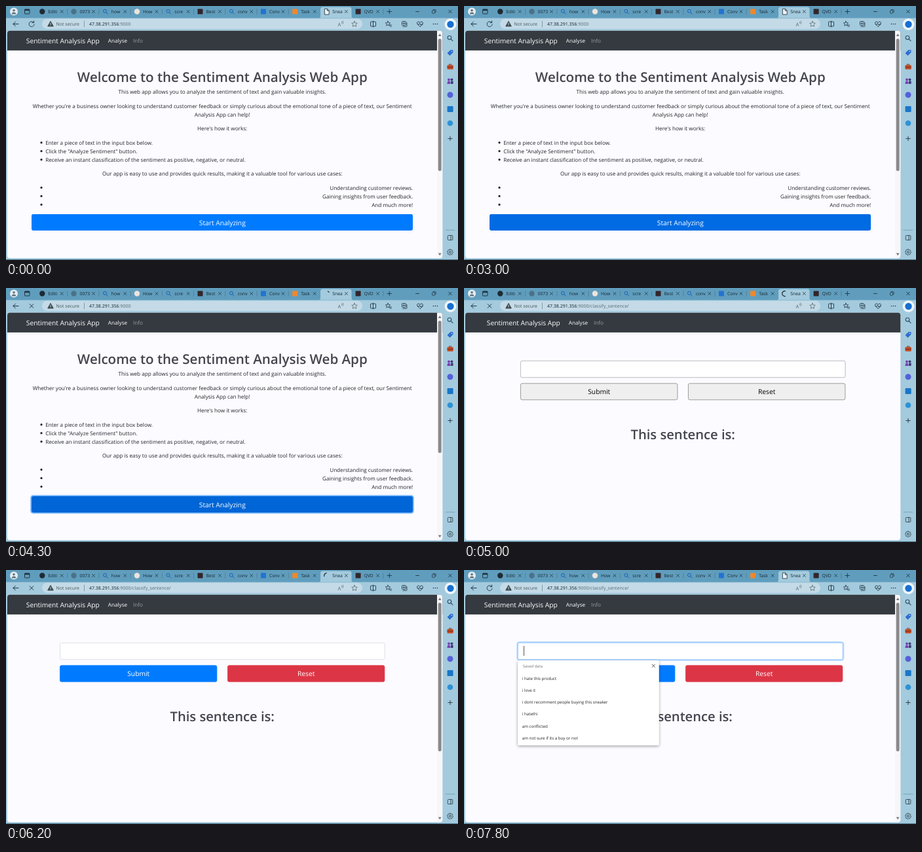
An HTML page for the animation above (8000 ms loop, 690 by 388 pixels).

```html
<!DOCTYPE html>
<html lang="en">
<head>
<meta charset="utf-8">
<title>Sentiment demo</title>
<style>
html, body { margin: 0; width: 100%; height: 100%; overflow: hidden; background: #a4cadd; }
svg { display: block; width: 690px; height: 388px; }
text { font-family: "Open Sans", "Noto Sans", sans-serif; text-rendering: geometricPrecision; white-space: pre; }
</style>
</head>
<body>
<svg id="stage" viewBox="0 0 690 388" xmlns="http://www.w3.org/2000/svg"></svg>
<script>
const LOOP = 8000, STEP = 100;
const INK = '#20343f', BODY = '#212529';
const stage = document.getElementById('stage');

// markup helpers
const text = (x, y, s, size, fill = BODY, extra = '') =>
  `<text x="${x}" y="${y}" font-size="${size}" fill="${fill}" ${extra}>${s}</text>`;
const mid = 'text-anchor="middle"', end = 'text-anchor="end"';
const rect = (x, y, w, h, fill, r = 0, extra = '') =>
  `<rect x="${x}" y="${y}" width="${w}" height="${h}" rx="${r}" fill="${fill}" ${extra}/>`;
const dot = (x, y, r, fill, extra = '') =>
  `<circle cx="${x}" cy="${y}" r="${r}" fill="${fill}" ${extra}/>`;
const line = (d, color = INK, w = 0.9, extra = '') =>
  `<path d="${d}" fill="none" stroke="${color}" stroke-width="${w}" stroke-linecap="round" stroke-linejoin="round" ${extra}/>`;
const cross = (x, y, r, color = INK, w = 0.9) =>
  line(`M${x - r} ${y - r}l${2 * r} ${2 * r}m0 ${-2 * r}l${-2 * r} ${2 * r}`, color, w);
const lens = (x, y, r, color, w) =>
  line(`M${x + r * .7} ${y + r * .7}l${r * 1.1} ${r * 1.1}`, color, w) +
  dot(x, y, r, 'none', `stroke="${color}" stroke-width="${w}"`);
const group = (id, inner, extra = '') => `<g id="${id}" ${extra}>${inner}</g>`;

// closed ring of points whose radius alternates: stars and gears
function spiky(x, y, points, radius) {
  let d = '';
  for (let i = 0; i < points; i++) {
    const a = -Math.PI / 2 + i * 2 * Math.PI / points, r = radius(i);
    d += `${i ? 'L' : 'M'}${(x + r * Math.cos(a)).toFixed(2)} ${(y + r * Math.sin(a)).toFixed(2)}`;
  }
  return d + 'Z';
}
const star = (x, y, r) => spiky(x, y, 10, i => i % 2 ? r * .48 : r);
const gear = (x, y, r) => spiky(x, y, 32, i => i % 4 < 2 ? r : r * .8);

function tabStrip() {
  const labels = ['Editi', '0073', 'how', 'How', 'scre', 'Best', 'conv', 'Conv', 'Task', 'Snea', 'QVD'];
  const search = x => lens(x - .8, 7.8, 2.5, '#1762b8', 1);
  const disc = color => x => dot(x, 8.5, 4.2, color);
  const block = color => x => rect(x - 4, 4.5, 8, 8, color, .8);
  const icons = [disc('#1f2a33'), disc('#4b7287'), search, disc('#eee3dc'), search, block('#33252a'),
    search, block('#2273d2'), block('#f0882b'), () => '', block('#33252a')];
  let s = rect(0, 0, 690, 19, '#609dbd') +
    '<path d="M477 18.5q3 0 3-3V5q0-3.5 3.5-3.5h40.5q3.5 0 3.5 3.5v10.5q0 3 3 3Z" fill="#a4cadd"/>';
  s += dot(12, 8.5, 6, '#e3edf2') + dot(12, 6.8, 1.8, '#64747d') +
    '<path d="M8.8 12.5q0-3 3.2-3t3.2 3Z" fill="#64747d"/>';
  s += rect(28.5, 5, 7.5, 7, 'none', 1, `stroke="${INK}"`) + rect(28.5, 5, 7.5, 2.2, INK);
  labels.forEach((label, i) => {
    const x = 55.3 + i * 48.23;
    s += icons[i](x) + text(x + 9, 11, label, 6.8, '#17262f') + cross(x + 30, 8.5, 2, INK, .8);
    if (i !== 8 && i !== 9) s += line(`M${x + 38.3} 5v7.5`, '#47798f', .7);
  });
  s += line('M582 8.5h6.5m-3.25-3.25v6.5');
  s += line('M625.5 8.5h5') + rect(650.5, 7, 4.2, 4.2, 'none', .7, `stroke="${INK}" stroke-width=".8"`) +
    line('M652 5.5h3.2q.9 0 .9 .9v3.2', INK, .8) + cross(678, 8.5, 2.3);
  return s;
}

function toolbar() {
  let s = rect(0, 18.5, 690, 20, '#a4cadd') + rect(55, 19.5, 489, 15.5, '#c4dbe7', 7.7);
  s += line('M19 27.5h-8m3.5-3.5l-3.5 3.5l3.5 3.5', INK, 1);
  s += group('reload', line('M42.3 25.2a4 4 0 1 0 .8 2.8m-.5-5.2v2.6h-2.6', INK, .9));
  s += group('stop', cross(39, 27.5, 2.8, INK, 1));
  s += '<path d="M68 23.3l4.3 7.7h-8.6Z" fill="#3d4a51" stroke="#3d4a51" stroke-linejoin="round"/>' +
    line('M68 26v2.3m0 1.3v.1', '#dcebf2', .9);
  s += text(76.5, 30, 'Not secure', 7, '#47555c') + line('M119.5 23v9', '#6d8996', .8);
  s += `<text x="127" y="30" font-size="7" fill="#13222b">47.38.291.356<tspan fill="#586a74">:9000<tspan id="path"></tspan></tspan></text>`;
  s += text(506.5, 30.5, 'A', 7.5, '#56666f') + line('M512.5 24q1 1 0 2.3m1.6-3.5q2 2.2 0 4.7', '#56666f', .7);
  s += line(star(532, 27.7, 4.5), '#56666f', .8);
  s += rect(556.5, 24, 8, 7, 'none', 1, `stroke="${INK}" stroke-width=".9"`) + line('M560.5 23v9');
  s += line(star(583, 27, 3.8), INK, .8) + line('M585.5 29h3m-2.5 2h2.5', INK, .8);
  s += rect(604.5, 23.5, 6, 6, 'none', 1, `stroke="${INK}" stroke-width=".9"`) +
    line('M612 25.5v5q0 1-1 1h-5m1.5-6.5v3m-1.5-1.5h3', INK, .8);
  s += line('M632 31.5l-4-4q-1.3-2.2 .5-3.3q2-.8 3.5 1.2q1.5-2 3.5-1.2q1.8 1.1 .5 3.3ZM628.5 28h2l1-1.5l1.5 2.5l1-1h2');
  for (const x of [652.5, 655.5, 658.5]) s += dot(x, 27.5, .8, INK);
  return s;
}

function sidebar() {
  const x = 678;
  let s = rect(666, 38, 24, 350, '#a4cadd');
  s += dot(678.5, 28, 9, '#eef5fa') + dot(678.5, 28, 5.2, '#176fd0');
  s += lens(x - 1, 48.3, 2.8, '#34536a', 1.2);
  s += '<path d="M674 72l4.5-4.5h3.5v3.5l-4.5 4.5Z" fill="#2f6fd0" stroke="#2f6fd0" stroke-linejoin="round"/>' +
    dot(680.3, 69.2, .8, '#d5e6f7');
  s += line('M676.5 90.5v-1.5h3.2v1.5', '#7d3a20', 1) + rect(673.5, 90.3, 9.2, 6.5, '#c04a24', 1) +
    rect(673.5, 93, 9.2, 1, '#7d2e16');
  s += dot(676, 112.5, 1.9, '#7b3fb5') + '<path d="M673.5 119q0-4.5 2.5-4.5t2.5 4.5Z" fill="#7b3fb5"/>' +
    dot(680.5, 112.3, 1.9, '#3b3d73') + rect(679, 114.5, 3.6, 4.5, '#3b3d73', .8);
  s += dot(x, 135.8, 4.5, '#5560d8') + rect(673.6, 153, 9, 9, '#1976c8', 1) + dot(x, 179, 4.3, '#2e92d5');
  s += line('M674.8 202.5h6.4m-3.2-3.2v6.4');
  s += line('M671 342.3h14', '#6795aa', .7);
  s += rect(674.3, 350.5, 7.5, 7, 'none', 1, `stroke="${INK}" stroke-width=".8"`) + line('M679 350.5v7', INK, .8);
  s += line(gear(x, 376, 4.5), INK, .8) + dot(x, 376, 1.5, 'none', `stroke="${INK}" stroke-width=".8"`);
  return s;
}

function homePage() {
  const lines = [
    [134, 'This web app allows you to analyze the sentiment of text and gain valuable insights.'],
    [156, 'Whether you\'re a business owner looking to understand customer feedback or simply curious about the emotional tone of a piece of text, our Sentiment'],
    [168.7, 'Analysis App can help!'],
    [190, 'Here\'s how it works:'],
    [259, 'Our app is easy to use and provides quick results, making it a valuable tool for various use cases:']
  ];
  const steps = ['Enter a piece of text in the input box below.', 'Click the "Analyze Sentiment" button.',
    'Receive an instant classification of the sentiment as positive, negative, or neutral.'];
  const uses = ['Understanding customer reviews.', 'Gaining insights from user feedback.', 'And much more!'];
  let s = text(330.3, 115.5, 'Welcome to the Sentiment Analysis Web App', 20.55, '#45454e', mid + ' font-weight="600"');
  for (const [y, str] of lines) s += text(330.2, y, str, 8.18, BODY, mid);
  steps.forEach((str, i) => { s += dot(54, 208.7 + 13 * i, 1.6, BODY) + text(60.2, 211.6 + 13 * i, str, 8.15); });
  uses.forEach((str, i) => { s += dot(54, 277.4 + 13 * i, 1.6, BODY) + text(621.3, 280.5 + 13 * i, str, 8.15, BODY, end); });
  s += rect(38.1, 317.1, 583.8, 26.8, 'none', 3.4, 'id="startRing" stroke="#007bff" stroke-width="1.9" stroke-opacity=".5"');
  s += rect(39, 318, 582, 25, '#007bff', 2.4, 'id="start"');
  return s + text(330.3, 334.6, 'Start Analyzing', 10.25, '#fff', mid);
}

function formPage() {
  const edge = 'stroke-width=".7"';
  return rect(81.3, 110.2, 498, 27.6, 'none', 3.2, 'id="inputRing" stroke="#007bff" stroke-width="1.9" stroke-opacity=".3"') +
    rect(82.4, 111.3, 495.7, 25.4, '#fff', 2.2, 'id="input" ' + edge) +
    rect(82.4, 145.8, 239.5, 25, '#007bff', 2.4, 'id="submit" ' + edge) +
    rect(338.4, 145.8, 239.5, 25, '#dc3545', 2.4, 'id="reset" ' + edge) +
    text(202.2, 162.2, 'Submit', 10.25, '#fff', mid + ' id="submitText"') +
    text(458.2, 162.2, 'Reset', 10.25, '#fff', mid + ' id="resetText"') +
    text(330.2, 230.5, 'This sentence is:', 20.2, '#45454e', mid + ' font-weight="600"') +
    rect(91, 116, 1, 15, '#555', 0, 'id="caret"');
}

function savedList() {
  const items = ['i hate this product', 'i love it', 'i dont recomment people buying this sneaker',
    'i hatethi', 'am conflicted', 'am not sure if its a buy or not'];
  let s = rect(82, 138, 215.7, 129.8, '#fff', 2.5, 'filter="url(#shade)"') +
    text(89.8, 148.8, 'Saved data', 5.9, '#74747a') + cross(289.3, 146.3, 2.2, '#333', .8);
  items.forEach((str, i) => { s += text(88.8, 167.5 + 18.32 * i, str, 6.2, '#222'); });
  return s;
}

stage.innerHTML =
  `<defs><clipPath id="view">${rect(2, 37.7, 664.3, 347.6, '#000', 4)}</clipPath>
  <filter id="shade" x="-10%" y="-10%" width="120%" height="125%"><feDropShadow dx="0" dy="1.5" stdDeviation="2" flood-color="#000" flood-opacity=".38"/></filter></defs>` +
  rect(0, 0, 690, 388, '#a4cadd') + tabStrip() +
  group('file', '<path d="M486.3 4.3h4.2l2.7 2.7v6h-6.9ZM490.3 4.5v2.7h2.7" fill="#eef5f9" stroke="#2b3b44" stroke-width=".9" stroke-linejoin="round"/>') +
  line('', '#16242c', 1.2, 'id="spinner"') +
  toolbar() + sidebar() +
  rect(0, 387, 690, 1, '#476f84') +
  group('page',
    rect(2, 37, 665, 349, '#fcfbff') + rect(2, 37, 665, 30.9, '#343a40') +
    group('shift',
      text(30.8, 57.1, 'Sentiment Analysis App', 10.25, '#fff') +
      text(155.8, 56.4, 'Analyse', 8.18, '#fff') +
      text(194, 56.4, 'Info', 8.18, '#989ca0') +
      group('home', homePage()) + group('form', formPage())) +
    group('bar', rect(658, 37, 8.5, 349, '#f7f7f9') +
      '<path d="M659.7 46l2.5-3.8l2.5 3.8ZM659.7 377.5l2.5 3.8l2.5-3.8Z" fill="#7c7c7f"/>' +
      rect(659.7, 50, 5, 202, '#8a8a8d', 2.5, 'id="thumb"')) +
    group('saved', savedList()),
    'clip-path="url(#view)"');

const el = {};
stage.querySelectorAll('[id]').forEach(n => { el[n.id] = n; });
const set = (id, name, v) => el[id].setAttribute(name, v);
const show = (id, on) => set(id, 'opacity', +on);
const phase = (t, from, span = 150) => {
  const p = Math.min(1, Math.max(0, (t - from) / span));
  return p * p * (3 - 2 * p);
};
const mix = (a, b, p) => a.map((v, i) => v + (b[i] - v) * p);
const rgb = c => `rgb(${c.map(Math.round)})`;

const WHITE = [255, 255, 255], BLACK = [0, 0, 0], BLUE = [0, 123, 255], HOVER = [0, 107, 227],
  PRESS = [0, 101, 215], RED = [220, 53, 69], FACE = [239, 239, 239], EDGE = [118, 118, 118],
  FIELD = [206, 212, 218], FIELD_RAW = [160, 160, 165], FOCUS = [128, 189, 255];

function spinnerPath(t) {
  const a = 180 + 360 * (t - 3900) / 1100;
  const half = (110 - 90 * Math.cos(2 * Math.PI * (t - 3900) / 440)) / 2;
  const at = deg => {
    const r = deg * Math.PI / 180;
    return `${(489.7 + 4 * Math.cos(r)).toFixed(2)} ${(8.6 + 4 * Math.sin(r)).toFixed(2)}`;
  };
  return `M${at(a - half)}A4 4 0 ${half > 90 ? 1 : 0} 1 ${at(a + half)}`;
}

function draw(t) {
  const loading = t >= 3400 && t < 6800;
  const onForm = t >= 4900;
  const wide = onForm && t < 5100;
  show('file', !loading);
  show('spinner', loading);
  show('reload', !loading);
  show('stop', loading);
  if (loading) set('spinner', 'd', spinnerPath(t));
  el.path.textContent = onForm ? '/classify_sentence/' : '';

  show('home', !onForm);
  show('form', onForm);
  show('bar', !wide);
  set('shift', 'transform', `translate(${wide ? 4 : 0} 0)`);
  set('thumb', 'height', onForm ? 227 : 202);

  const press = phase(t, 3340);
  set('start', 'fill', rgb(mix(mix(BLUE, HOVER, phase(t, 1735)), PRESS, press)));
  set('startRing', 'opacity', press);

  const styled = phase(t, 5000), focus = phase(t, 6740);
  const skin = (id, color) => {
    set(id, 'fill', rgb(mix(FACE, color, styled)));
    set(id, 'stroke', rgb(mix(EDGE, color, styled)));
    set(id + 'Text', 'fill', rgb(mix(BLACK, WHITE, styled)));
  };
  skin('submit', BLUE);
  skin('reset', RED);
  set('input', 'stroke', rgb(mix(mix(FIELD_RAW, FIELD, styled), FOCUS, focus)));
  set('inputRing', 'opacity', focus);
  show('caret', t >= 6800 && Math.floor((t - 6800) / 500) % 2 === 0);
  set('saved', 'opacity', phase(t, 6850, 200));
}

function tick(now) {
  draw(Math.floor((now % LOOP) / STEP) * STEP);
  requestAnimationFrame(tick);
}
draw(0);
requestAnimationFrame(tick);
</script>
</body>
</html>
```
